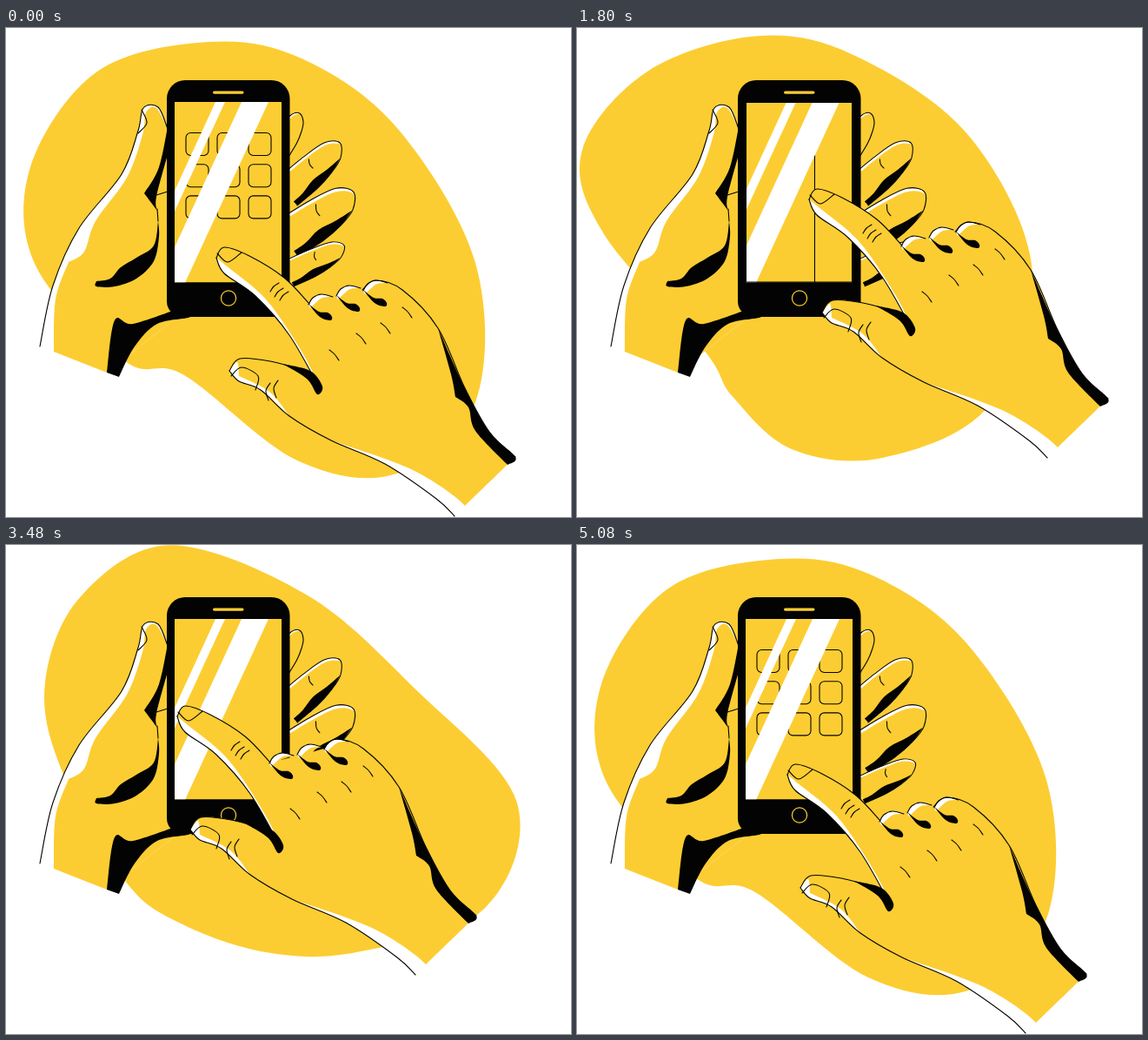
Animation of 650 by 562 pixels, one loop 5.12 s. Source, as an HTML page with a canvas:

```html
<!DOCTYPE html>
<html lang="en">
<head>
<meta charset="utf-8">
<title>Phone gestures</title>
<style>
  html, body { margin: 0; width: 100%; height: 100%; overflow: hidden; background: #fff; }
  canvas { display: block; }
</style>
</head>
<body>
<canvas id="stage" width="650" height="562"></canvas>
<script>
const ctx = document.getElementById('stage').getContext('2d');
const LOOP = 5120;
const YELLOW = '#fccd32', BLACK = '#030303', WHITE = '#fff';

const ease = p => (1 - Math.cos(Math.PI * p)) / 2;
const mix = (a, b, p) => a + (b - a) * p;
const span = (t, a, b) => Math.min(1, Math.max(0, (t - a) / (b - a)));
const hump = (t, a, b) => Math.sin(Math.PI * span(t, a, b));
const points = s => s.trim().split(/\s+/).map(q => q.split(',').map(Number));

// Smooth spline through the points, open or closed.
function spline(path, pts, closed) {
  const n = pts.length;
  const at = i => closed ? pts[(i + n) % n] : pts[Math.max(0, Math.min(n - 1, i))];
  for (let i = 0; i < (closed ? n : n - 1); i++) {
    const [a, b, c, d] = [at(i - 1), at(i), at(i + 1), at(i + 2)];
    path.bezierCurveTo(
      b[0] + (c[0] - a[0]) / 6, b[1] + (c[1] - a[1]) / 6,
      c[0] - (d[0] - b[0]) / 6, c[1] - (d[1] - b[1]) / 6, c[0], c[1]);
  }
}

// A bar in the text marks a sharp corner.
function shape(text) {
  const path = new Path2D();
  let last = null;
  for (const part of text.split('|')) {
    const pts = points(part);
    if (last) pts.unshift(last); else path.moveTo(...pts[0]);
    spline(path, pts, false);
    last = pts[pts.length - 1];
  }
  return path;
}

function fill(path, color) { ctx.fillStyle = color; ctx.fill(path); }
function line(path, color = BLACK, width = 1.1) {
  ctx.strokeStyle = color;
  ctx.lineWidth = width;
  ctx.stroke(path);
}

// Runs a drawing in its own moved, turned or scaled space.
function place(x, y, draw, angle = 0, sx = 1, sy = 1) {
  ctx.save();
  ctx.translate(x, y);
  ctx.rotate(angle);
  ctx.scale(sx, sy);
  draw();
  ctx.restore();
}

// Eased value between the [time, value] keys around t.
function track(keys, t, blend = mix) {
  let i = 0;
  while (i < keys.length - 2 && t >= keys[i + 1][0]) i++;
  const [[t0, a], [t1, b]] = [keys[i], keys[i + 1]];
  return blend(a, b, ease(span(t, t0, t1)));
}

// ---- background blob ----
const round1 = points('233,16 105,50 28,160 35,275 137,383 205,399 335,497 450,512 540,430 540,270 450,115 340,35');
const round2 = points('205,10 80,50 4,140 29,235 147,370 178,423 245,485 350,495 470,435 521,280 450,122 315,29');
const round3 = points('188,0 85,60 45,160 65,260 137,386 200,435 300,468 405,467 550,418 588,295 470,165 345,57');
const blobKeys = [[0, round1], [1580, round2], [3200, round3], [3360, round3], [5080, round1]];
const mixPoints = (a, b, p) => a.map((q, i) => [mix(q[0], b[i][0], p), mix(q[1], b[i][1], p)]);

function drawBlob(t) {
  const pts = track(blobKeys, t, mixPoints);
  const path = new Path2D();
  path.moveTo(...pts[0]);
  spline(path, pts, true);
  fill(path, YELLOW);
}

// ---- holding hand ----
// One finger lying along the x axis, 100 long.
const finger = {
  out: shape('0,-25 50,-22 85,-16 100,0 87,17 65,24 36,27 0,25'),
  dark: shape('0,17 17,17 39,13 63,16 86,17 | 65,24 36,27 0,25'),
  crease: shape('54,-14 50,-7 50,0')
};

function drawFinger(x, y, angle, size, girth, shaded) {
  place(x, y, () => {
    fill(finger.out, WHITE);
    ctx.save();
    ctx.clip(finger.out);
    ctx.translate(-1, 4);
    fill(finger.out, YELLOW);
    ctx.restore();
    if (shaded) fill(finger.dark, BLACK);
    line(finger.out, BLACK, 1.1 / size);
    if (shaded) line(finger.crease, BLACK, 1.1 / size);
  }, angle, size, size * girth);
}

const palmEdge = '39,366 54,296 84,230 133,168 152,118 158,92 175,91 186,116';
const holder = {
  base: shape(palmEdge + ' | 200,116 | 200,330 | 116,396 | 55,372'),
  edge: shape(palmEdge),
  skin: shape(`55,372 57,312 72,269 | 90,257 103,222 139,172 157,123 161,97 173,92 186,116
    | 200,116 | 200,330 | 116,396`),
  nail: shape('156,94 162,109 152,121'),
  wedge: shape('187,108 176,160 159,190 | 174,210 | 173,194 187,142'),
  fold: shape('174,208 175,222'),
  palm: shape('175,222 170,250 150,264 132,275 120,288 104,291 | 104,297 125,297 150,288 170,268 176,240 175,222'),
  crease: shape('173,192 186,188'),
  wrist: shape('116,396 125,336 146,340 200,322 | 212,332 174,340 148,366 130,401')
};

function drawHolder() {
  drawFinger(314, 142, -1.08, 0.5, 1, false);
  drawFinger(322, 190, -0.75, 0.85, 0.9, true);
  drawFinger(322, 243, -0.61, 0.95, 1, true);
  drawFinger(324, 283, -0.47, 0.73, 0.85, true);
  fill(holder.base, WHITE);
  fill(holder.skin, YELLOW);
  for (const k of ['wedge', 'palm', 'wrist']) fill(holder[k], BLACK);
  for (const k of ['edge', 'nail', 'fold', 'crease']) line(holder[k]);
}

// ---- phone ----
const screen = { x: 194, y: 85, w: 123, h: 207.5 };

function box(x, y, w, h, r) {
  const path = new Path2D();
  path.roundRect(x, y, w, h, r);
  return path;
}

function glare(left, right) {
  const shift = screen.h * 0.461, end = screen.y + screen.h;
  fill(shape(`${left},85 | ${right},85 | ${right - shift},${end} | ${left - shift},${end}`), WHITE);
}

// Edge between two pages; the first opens, the others follow the finger.
function pageEdge(t, x) {
  const swiping = (t > 2240 && t < 2620) || (t > 3020 && t < 3400);
  if (t > 1480 && t < 2020) return screen.w * ease(span(t, 1480, 2020));
  return swiping ? screen.w * (x + 45) / 70 : 0;
}

function drawPhone(t, handX) {
  fill(box(185, 60, 141.5, 272, [21, 21, 18, 18]), BLACK);
  fill(box(238, 72.5, 35.5, 3.2, 1.6), YELLOW);
  line(box(247.4, 301.9, 17.2, 17.2, 8.6), YELLOW, 1.2);

  const { x, y, w, h } = screen, glass = box(x, y, w, h, 0);
  ctx.save();
  ctx.clip(glass);
  fill(glass, YELLOW);
  if (t < 1120 || t > 3720) {
    for (let i = 0; i < 9; i++) {
      line(box(207 + 36 * (i % 3), 120.5 + 36.2 * Math.floor(i / 3), 26, 26, 5.5));
    }
  }
  const edge = pageEdge(t, handX);
  if (edge) line(box(x + edge, y, 0, h, 0));
  glare(241, 252);
  glare(271, 302);
  if (edge) line(glass, BLACK, 2);
  ctx.restore();
}

// ---- pointing hand ----
const backEdge = '410,301 425,290 456,301 497,345 528,414 556,464 586,493';
const indexTop = '242,264 251,252 280,262 320,287 349,317';
const indexLow = '242,264 251,282 287,308 326,353 362,416';
const thumbTop = '257,394 269,380 304,383 345,394';
const thumbLow = '257,394 268,406 293,416 326,446';
const armLow = '374,474 436,501 495,541 516,561';
const reverse = s => s.split(' ').reverse().join(' ');

const pointer = {
  base: shape([indexTop, backEdge, '528,549', '516,561', reverse(thumbLow + ' ' + armLow),
    thumbTop, '362,416', reverse(indexLow)].join(' | ')),
  lit: [indexLow + ' | 342,375 300,313 253,273 242,264',
    thumbLow + ' | 303,418 268,400 | 266,384 257,394',
    armLow + ' | 528,549 468,508 374,474'].map(shape),
  dark: ['318,386 350,394 364,412 358,421 346,403 318,386',
    '497,345 512,398 517,424 | 532,436 540,463 577,502 | 586,493 556,464 528,414 497,345'].map(shape),
  lines: [indexTop, indexLow, thumbTop, thumbLow + ' ' + armLow, backEdge,
    '243,259 255,269 271,258', '259,400 271,390 290,400 287,416'].map(shape)
};

const bump = '0,0 5,-8 15,-12 28,-9';
const knuckle = {
  top: shape(bump),
  lit: shape(bump + ' | 16,-8 8,-2 2,4'),
  gap: shape('0,-1 12,8 22,9 27,14 25,18 13,14 0,-1')
};
const marks = [
  ['0,0 6,5 11,12', '372,370 403,351 431,339 456,321'],
  ['0,0 4,-6 10,-10', '304,303 309,309 315,313'],
  ['0,0 -5,9 -2,20', '304,408 313,405']
].map(([form, spots]) => [shape(form), points(spots)]);

function drawKnuckle() {
  fill(knuckle.top, YELLOW);
  fill(knuckle.lit, WHITE);
  fill(knuckle.gap, BLACK);
  line(knuckle.top);
}

function drawPointer() {
  fill(pointer.base, YELLOW);
  pointer.lit.forEach(p => fill(p, WHITE));
  for (const [x, y] of points('348,318 380,308 411,302')) place(x, y, drawKnuckle);
  pointer.dark.forEach(p => fill(p, BLACK));
  pointer.lines.forEach(p => line(p));
  for (const [form, spots] of marks) {
    for (const [x, y] of spots) place(x, y, () => line(form));
  }
}

// Tap an icon, swipe twice, flick the phone and return.
const handX = [[0, 0], [100, 0], [860, 48], [900, 48], [1560, 25], [2240, 25], [2610, -45], [2640, -45],
  [2960, 25], [3020, 25], [3380, -45], [3480, -45], [3760, 66], [4340, 0]];
const handY = [[0, 0], [100, 0], [920, -67], [3530, -67], [4190, 0]];

function turn(x, y, angle) {
  ctx.translate(x, y);
  ctx.rotate(angle);
  ctx.translate(-x, -y);
}

function draw(t) {
  ctx.fillStyle = WHITE;
  ctx.fillRect(0, 0, 650, 562);
  ctx.lineCap = ctx.lineJoin = 'round';
  const x = track(handX, t);
  drawBlob(t);

  ctx.save();
  turn(45, 368, 0.009 * hump(t, 3560, 4360));
  drawHolder();
  drawPhone(t, x);
  ctx.restore();

  ctx.save();
  ctx.translate(x, track(handY, t));
  turn(550, 527, 0.05 * hump(t, 100, 860));
  drawPointer();
  ctx.restore();
}

const start = performance.now();
function tick() {
  draw((performance.now() - start) % LOOP);
  requestAnimationFrame(tick);
}
tick();
</script>
</body>
</html>
```
